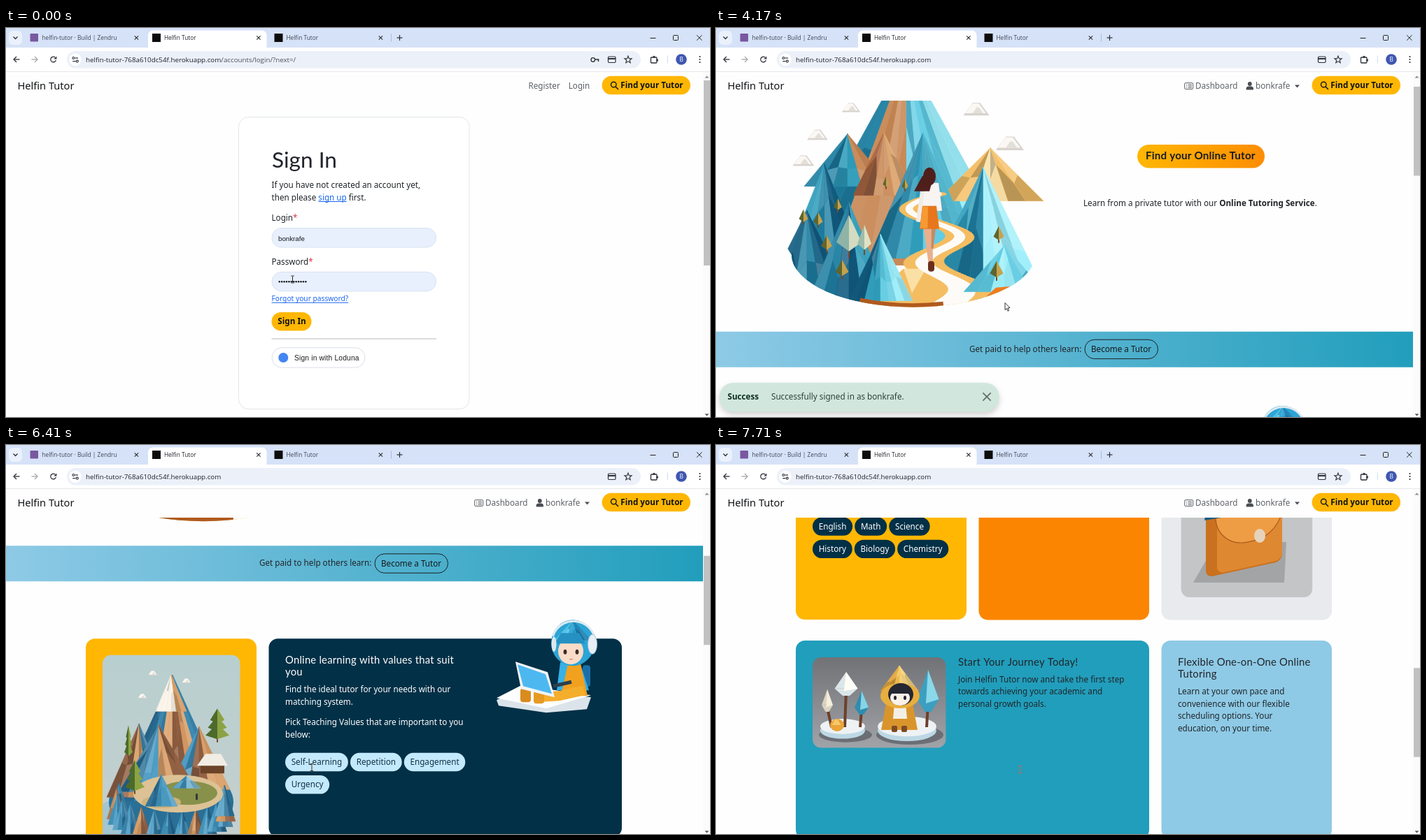
An HTML page with a canvas that plays this animation: 1006 by 557 pixels, repeating every 8000 ms.

```html
<!DOCTYPE html>
<html lang="en">
<head>
<meta charset="utf-8">
<title>Helfin Tutor</title>
<style>
html, body { margin: 0; width: 100%; height: 100%; overflow: hidden; background: #fefefe; }
canvas { display: block; }
</style>
</head>
<body>
<canvas id="stage" width="1006" height="557"></canvas>
<script>
const c = document.getElementById('stage').getContext('2d');
const LOOP = 8000, TAU = Math.PI * 2, LINE = 17.55;
const BRAND = 'Helfin Tutor', USER = 'bonkrafe', HOST = 'helfin-tutor-768a610dc54f.herokuapp.com';
const INK = '#212529', DARK = '#2c2f36', GREY = '#5d6166', WHITE = '#fff';
const NAVY = '#023047', YELLOW = '#ffb703', ORANGE = '#fb8500', TEAL = '#219ebc', SKY = '#8ecae6', ICE = '#c3e9fc';

const noto = (size, weight = 400) => `${weight} ${size}px "Noto Sans", sans-serif`;
const open = size => `${size}px "Open Sans", sans-serif`;
const lato = (size, weight = 400) => `${weight} ${size}px Lato, sans-serif`;
const arial = size => `${size}px "Liberation Sans", Arial, sans-serif`;
const BODY = noto(11.68), SEMI = noto(11.68, 600), BOLD = noto(11.68, 700), HEAD = lato(14.8);

// ---------- timing ----------
// The screen refreshes in bursts: start, end, number of refreshes
const BURSTS = [[0, 0, 1], [150, 840, 6], [1430, 2450, 9], [2570, 3350, 7], [3650, 3770, 2],
  [4170, 5070, 8], [5220, 6260, 7], [6410, 6980, 5], [7260, 7710, 4]];
const PRESS = 1430, LOADED = 2570, SETTLED = 3090, CLOSING = 5480;

const part = (t, a, b) => Math.min(1, Math.max(0, (t - a) / (b - a)));
const easeOut = p => 1 - (1 - p) ** 2;

function refresh(t) {
  const [a, b, n] = BURSTS.filter(k => k[0] <= t).pop();
  const gap = (b - a) / (n - 1) || 1;
  return Math.min(b, a + Math.floor((t - a) / gap + .01) * gap);
}
const scrollAt = t => 217 * easeOut(part(t, 4130, 4600)) + 367 * part(t, 6170, 6980) + 366 * easeOut(part(t, 7200, 7710));
const toastAt = t => part(t, 2700, 2960) - part(t, CLOSING, CLOSING + 110);

// Pointer trips: start, end, place reached
const TRIPS = [[0, 840, 400, 414], [3520, 3770, 413, 393.5], [4550, 5070, 384, 529], [5740, 6260, 437, 461.5], [6560, 6840, 434.5, 464.5]];
function mouseAt(t) {
  let x = 409.5, y = 360;
  for (const [a, b, tx, ty] of TRIPS) {
    const p = part(t, a, b);
    x += (tx - x) * p;
    y += (ty - y) * p;
  }
  return [x, y];
}
function shapeAt(t, y) {
  if (t < LOADED) return y < 377 ? 'beam' : y < 393 || y > 407 ? 'hand' : 'arrow';
  if (t >= 5070 && t < 5740) return 'hand';
  return t >= 6260 && t < 6560 || t >= 7710 ? 'beam' : 'arrow';
}
function rng(seed) {
  let v = seed * 7919 + 13;
  return () => (v = (v * 1664525 + 1013904223) >>> 0) / 4294967296;
}

// ---------- drawing helpers ----------
function paint(fill, edge, w = 1) {
  if (fill) { c.fillStyle = fill; c.fill(); }
  if (edge) { c.strokeStyle = edge; c.lineWidth = w; c.stroke(); }
}
function box(x, y, w, h, r, fill, edge, lw) {
  c.beginPath();
  c.roundRect(x, y, w, h, r);
  paint(fill, edge, lw);
}
function oval(x, y, rx, ry, fill, edge, lw) {
  c.beginPath();
  c.ellipse(x, y, rx, ry, 0, 0, TAU);
  paint(fill, edge, lw);
}
function trace(v) {
  c.beginPath();
  for (let i = 0; i < v.length; i += 2) c.lineTo(v[i], v[i + 1]);
}
function poly(fill, ...v) { trace(v); c.closePath(); paint(fill); }
function line(color, w, ...v) { trace(v); paint(null, color, w); }
// Trapezium hung from the middle of its top edge
function trap(fill, x, y, top, bottom, h, lean = 0) {
  poly(fill, x - top / 2, y, x + top / 2, y, x + lean + bottom / 2, y + h, x + lean - bottom / 2, y + h);
}
function cross(x, y, r, color, w) {
  line(color, w, x - r, y - r, x + r, y + r);
  line(color, w, x - r, y + r, x + r, y - r);
}
function at(dx, dy, art) {
  c.save();
  c.translate(dx, dy);
  art();
  c.restore();
}
function blend(x0, y0, x1, y1, from, to) {
  const g = c.createLinearGradient(x0, y0, x1, y1);
  g.addColorStop(0, from);
  g.addColorStop(1, to);
  return g;
}
function txt(s, x, y, color = INK, font = BODY, gap = 0) {
  c.font = font;
  c.letterSpacing = gap + 'px';
  c.fillStyle = color;
  c.fillText(s, x, y);
  return x + c.measureText(s).width;
}
function link(s, x, y, font) {
  const end = txt(s, x, y, '#1a66f2', font);
  box(x, y + 1.5, end - x, 1, 0, '#1a66f2');
  return end;
}
// Heading and paragraphs (split by |); returns the last baseline
function prose(x, y, title, paragraphs, color = INK) {
  title.split('|').forEach((s, i) => txt(s, x, y += i && LINE, color, HEAD, .22));
  y += 24;
  paragraphs.forEach((p, n) => {
    if (n) y += 29.3;
    p.split('|').forEach((s, i) => txt(s, x, y += i && LINE, color));
  });
  return y;
}
function chips(list, left, y, room, bg, fg) {
  let x = left;
  list.split(' ').forEach(s => {
    c.font = BODY;
    c.letterSpacing = '0px';
    const w = c.measureText(s).width + 17.4;
    if (x + w > left + room) { x = left; y += 32.3; }
    box(x, y, w, 26.4, 13.2, bg);
    txt(s, x + 8.7, y + 17.3, fg);
    x += w + 3.1;
  });
}
function picture(x, y, w, h, fill, art) {
  c.save();
  box(x, y, w, h, 12, fill);
  c.clip();
  art();
  c.restore();
}

// ---------- low-poly parts ----------
function facet(color, tint, pts) {
  poly(color, ...pts.flat());
  paint(null, color, .6);
  paint(tint > 0 ? `rgba(255,255,255,${tint * .45})` : `rgba(0,25,45,${-tint * .5})`);
}
// Mountain as a fan of facets, coloured from left to right
function peak(x, y, w, h, cols, seed = 1) {
  const rnd = rng(seed), n = cols.length * 2;
  const spot = (i, f) => [x + (i / n * 2 - 1) * w * f, y + h * f];
  const mid = Array.from({ length: n + 1 }, (_, i) => spot(i, .3 + .45 * rnd()));
  for (let i = 0; i < n; i++) {
    const col = cols[i >> 1];
    facet(col, rnd() - .5, [[x, y], mid[i], mid[i + 1]]);
    facet(col, rnd() - .5, [mid[i], mid[i + 1], spot(i + 1, 1), spot(i, 1)]);
  }
}
function tree(x, y, w, h, dark, light, trunk = '#7a4a26') {
  box(x - 1, y + h * .7, 2, h * .5, 0, trunk);
  poly(dark, x, y, x - w / 2, y + h * .75, x, y + h);
  poly(light, x, y, x + w / 2, y + h * .75, x, y + h);
}
function cloud(x, y, s) {
  at(x, y, () => {
    trap('#d8d3cd', 0, -8 * s, 10 * s, 35 * s, 17 * s);
    trap('#fbf8f4', -1 * s, -7 * s, 9 * s, 28 * s, 13 * s);
    trap('#e3dfdb', 2 * s, -2 * s, 3 * s, 14 * s, 8 * s);
  });
}

// ---------- illustrations ----------
const DEEP = '#125c80', BLUE = '#1f7fa1', MID = '#2f9cba', AQUA = '#5fcbe2', PALE = '#9deefa';
const SAND = '#f4bd62', CREAM = '#fbe0a6', CLAY = '#c78652', RUST = '#a8623a';

function path(extra, color) {
  for (let u = 0; u < 1; u += .01) {
    const bend = Math.cos(TAU * (u - .14) / .48) * (38 - 19 * u);
    oval(308 + 25 * u - bend, 238 + 160 * u, 5 + 20 * u * u + extra * (.4 + u), 3, color);
  }
}
function walker() {
  trap('#e8b08c', 303, 286, 13, 6, 54, 4);
  trap('#c98865', 311, 286, 6, 3, 30, -2);
  box(303, 334, 9, 15, 4, '#6b2f1c');
  trap('#f7f4f2', 309, 222, 18, 32, 40, -2);
  line('#f0ece9', 6, 295, 234, 289, 278);
  trap('#e8761c', 305, 255, 20, 28, 33);
  trap('#f79a34', 299, 256, 8, 11, 31, -2);
  oval(305, 213, 9, 13, '#4f1f1c');
  trap('#4f1f1c', 303, 212, 16, 22, 22, -9);
}
function trail() {
  c.save();
  c.beginPath();
  c.ellipse(282, 325, 174, 75, 0, 0, Math.PI);
  c.lineTo(60, 250);
  c.lineTo(60, 0);
  c.lineTo(520, 0);
  c.lineTo(520, 250);
  c.clip();
  peak(272, 40, 165, 300, [BLUE, CLAY, CLAY, AQUA, AQUA, PALE], 3);
  peak(392, 172, 76, 76, [SAND, CREAM, SAND], 4);
  peak(188, 152, 62, 75, [BLUE, MID, CLAY], 5);
  peak(240, 150, 44, 90, [RUST, CLAY, '#dba36c'], 6);
  peak(296, 150, 78, 180, [BLUE, MID, AQUA, AQUA], 7);
  peak(155, 195, 60, 150, [MID, BLUE, DEEP], 8);
  peak(382, 200, 94, 190, [MID, BLUE, PALE, PALE], 9);
  peak(130, 262, 70, 140, [DEEP, BLUE, DEEP], 10);
  peak(190, 250, 62, 150, [BLUE, DEEP, MID], 11);
  path(17, SAND);
  poly(SAND, 268, 345, 300, 345, 345, 380, 325, 402, 200, 402);
  poly(CREAM, 268, 345, 300, 345, 280, 380);
  path(0, '#fdfbf7');
  peak(412, 312, 58, 66, [AQUA, PALE, AQUA], 12);
  poly('#ee7d1e', 378, 392, 400, 372, 445, 368, 425, 385);
  peak(235, 296, 46, 95, [DEEP, MID, AQUA, PALE], 13);
  c.beginPath();
  c.ellipse(282, 325, 173, 74, 0, 1.32, 2.03);
  paint(null, '#b05a1e', 9);
  c.restore();
  tree(190, 268, 36, 52, '#8fb3a6', '#d3dcc0');
  tree(212, 282, 20, 36, '#9fbca9', '#dfe3c6');
  for (const [x, y] of [[125, 260], [146, 264], [174, 244], [158, 297], [180, 332], [243, 213], [270, 216], [404, 284], [401, 334]])
    tree(x, y, 8 + (y - 200) / 12, 14 + (y - 200) / 14, '#5d6530', '#c6a24e');
  for (const [x, y] of [[193, 114], [372, 116], [145, 153], [125, 190], [420, 165]]) cloud(x, y, .75 + Math.abs(x - 200) / 550);
  walker();
}

function island() {
  const blue = '#4597c0', deep = '#2a6f96', tan = '#d79a62', brown = '#8f5d3e', snow = '#fbf3e8';
  oval(180, 560, 75, 55, '#a3c6d2');
  oval(236, 512, 89, 54, deep);
  peak(238, 330, 82, 180, [deep, blue, tan, brown, tan, blue], 2);
  peak(236, 330, 22, 52, [snow, snow, tan], 3);
  peak(190, 400, 46, 105, [brown, tan, deep], 4);
  peak(276, 404, 44, 90, [blue, brown, tan], 5);
  peak(218, 402, 56, 95, [deep, blue, tan, brown], 6);
  for (let i = 0; i <= 14; i++) {
    const a = Math.PI * (1.1 - i / 12), x = 236 + 78 * Math.cos(a), y = 494 + 30 * Math.sin(a);
    peak(x, y, 14, 44, i % 4 === 1 ? [tan, brown] : [blue, deep], i + 7);
  }
  oval(246, 500, 64, 27, '#dcc295');
  oval(260, 499, 42, 17, '#87914a');
  oval(222, 512, 28, 9, '#cfb27c');
  peak(222, 473, 23, 45, [deep, blue, blue], 30);
  peak(258, 474, 20, 18, [blue, SKY], 31);
  box(278, 457, 34, 14, 1, '#6b4328');
  trap('#f1ece4', 296, 443, 22, 44, 17, -1);
  [[302, 378, 34], [184, 452, 28], [175, 402, 12]].forEach(([x, y, w]) => {
    for (let i = 0; i < 3; i++) tree(x, y + i * 11, w * (.6 + i * .2), 22, '#4d6a2c', '#8ba343');
  });
  box(271, 500, 3, 9, 1, '#33383c');
  [[210, 327], [258, 338], [195, 360]].forEach(([x, y]) => cloud(x, y, .4));
}

function coder() {
  poly('#dbe4ea', 701, 366, 736, 348, 836, 362, 830, 379, 772, 384, 704, 374);
  poly('#fbfdfe', 701, 363, 736, 345, 836, 359, 772, 378);
  box(824, 316, 11, 31, 4, '#1b6fa8');
  trap('#39b1e6', 806, 312, 28, 46, 40, 4);
  trap('#f2a11f', 812, 314, 18, 38, 46);
  line('#f5ad2c', 14, 826, 352, 790, 360, 758, 362);
  box(735, 349, 15, 20, 4, '#d98b1d');
  box(754, 351, 15, 20, 4, '#e79a22');
  poly('#f0f4f7', 728, 311, 774, 326, 784, 362, 736, 350);
  poly('#4db8f0', 731, 315, 771, 329, 780, 357, 739, 346);
  line('#2e3f4c', 5, 782, 346, 808, 340);
  oval(810, 284, 31, 33, '#2ca5d6');
  peak(810, 252, 26, 28, ['#49bfe8', '#2ca5d6', '#1c7fb0'], 3);
  oval(807, 296, 18, 19, '#f8dcc8');
  trap('#2591c2', 806, 270, 26, 44, 15);
  [799, 816].forEach(x => oval(x, 297, 2.4, 3.6, '#3c2b27'));
  box(805, 307, 5, 1, 0, '#c77463');
  c.beginPath();
  c.arc(811, 284, 31, Math.PI * 1.1, TAU - .2);
  paint(null, '#dfeaf1', 3);
  oval(838, 286, 6.5, 14, '#e7eff5', '#9fc3d9');
  oval(783, 286, 3.5, 11, '#dbe7ef');
}

function satchel() {
  trap('#a3a4a6', 765, 505, 100, 130, 58, -18);
  c.save();
  c.transform(1, -.22, 0, 1, 700, 466);
  box(0, 0, 109, 90, 10, '#c9711f');
  box(16, 2, 93, 86, 10, '#df8832');
  box(14, 0, 95, 52, [4, 4, 40, 46], '#ee9d45', '#a9591a', 1.2);
  c.restore();
  poly('#f2f2f0', 796, 403, 810, 414, 811, 450, 760, 462, 756, 432);
  poly('#175a82', 698, 474, 704, 438, 768, 404, 786, 410, 762, 440, 722, 470);
  poly('#37b6d8', 704, 438, 768, 403, 798, 404, 720, 456);
  line('#8ee4f2', 2, 710, 442, 770, 408, 794, 407);
  oval(777, 496, 8, 10, '#e6d3bb');
}

function grove() {
  const pot = (x, rx) => {
    oval(x + 4, 415, rx + 6, rx / 3, '#6b6e75');
    oval(x, 409, rx, rx * .36, '#bcd8e4');
    oval(x, 403, rx, rx * .34, '#eef2f4');
  };
  const gem = (x, y, w, h, dark, light) => {
    line('#6d3f2a', 4, x, y + h * .8, x + (x < 180 ? 6 : -2), 404);
    trap(dark, x, y, 0, w, h * .7);
    trap(dark, x, y + h * .7, w, w * .3, h * .3);
    poly(light, x, y, x + w / 2, y + h * .7, x - w * .1, y + h * .8);
  };
  pot(181, 32);
  pot(273, 42);
  gem(159, 350, 16, 32, '#d9d3c0', '#f4eedb');
  gem(208, 352, 20, 34, '#2f8cb0', '#86d4e6');
  gem(186, 325, 33, 34, '#dbe6e9', '#fffdf6');
  gem(303, 322, 31, 60, '#3c9fc0', '#8ad8ea');
  oval(173, 401, 10, 9, '#eaa438');
  trap('#f7c769', 172, 393, 4, 13, 8);
  trap('#d9952c', 262, 370, 38, 52, 38);
  trap('#f3efe6', 263, 370, 16, 20, 22);
  peak(262, 316, 27, 36, ['#e3a335', '#f4c252', '#fbd981'], 8);
  oval(263, 359, 28, 18, '#e8ae3e');
  oval(264, 357, 18, 16, '#252832');
  oval(263, 362, 14, 11, '#faf1e9');
  trap('#252832', 264, 344, 18, 28, 12);
  [256, 270].forEach(x => {
    oval(x, 362, 2, 3, '#22252c');
    box(x - 5, 402, 8, 9, 2, '#7c4a25');
  });
}

// ---------- pages ----------
function signIn(t) {
  const entered = t >= PRESS;
  box(332.5, 127.5, 329.5, 418, 14, WHITE, '#e3e6e9');
  txt('Sign In', 380, 200, '#22242c', lato(31.6));
  txt('If you have not created an account yet,', 379.5, 229);
  txt(' first.', link('sign up', txt('then please ', 379.5, 246.6), 246.6), 246.6);
  [['Login', 276], ['Password', 338.8]].forEach(([s, y]) => {
    txt('*', txt(s, 379.5, y), y, '#dc3545');
    box(380, y + 10.6, 234.5, 27.4, 13.7, '#e8f0fe', '#d6e2f0');
  });
  txt(USER, 389, 304.5, '#15181b', entered ? BODY : arial(9.73));
  const gap = entered ? 4.35 : 3.42;
  for (let i = 0; i < 12; i++) oval(389 + gap * (i + .5), 363.3, gap * .36, gap * .36, '#15181b');
  link('Forgot your password?', 379.5, 391.3, noto(10.22));
  box(379.5, 407, 57, 26.4, 13.2, t >= 700 ? '#ffc333' : YELLOW);
  txt('Sign In', 388.3, 424.2, '#111', SEMI);
  box(379.5, 444.3, 235.5, 1.4, 0, '#cfd1d3');
  box(380, 457.8, 133, 28.4, 14.2, WHITE, '#dadfe6');
  oval(396.3, 472, 7, 7, '#4285f4');
  txt('Sign in with Loduna', 412, 475.6, '#1f1f1f', arial(10.22), .18);
}

const card = (x, y, w, h, fill) => box(x, y, w, h, 13, fill);

function hero() {
  trail();
  box(602, 167.3, 182, 33.6, 16.8, blend(602, 0, 784, 0, YELLOW, '#fd8d03'));
  txt('Find your Online Tutor', 614, 188.4, '#191c20', lato(15.2, 700), .18);
  txt('.', txt('Online Tutoring Service', txt('Learn from a private tutor with our ', 525, 255), 255, INK, BOLD), 255);
  box(0, 435, 996, 51, 0, blend(0, 0, 996, 0, SKY, TEAL));
  txt('Get paid to help others learn:', 362, 464);
  box(527, 446.6, 104.5, 27.4, 13.7, null, '#1c2024');
  txt('Become a Tutor', 536, 464.4, '#16191c');
}
function offers() {
  card(114, 278, 244, 597, YELLOW);
  picture(138, 301.5, 196.5, 287, blend(0, 302, 0, 588, '#b8cfcf', '#c6cfce'), island);
  let y = prose(138, 618, 'Online Tutoring Service with|the Subject you want',
    ['Find a private Tutor for the field|that you want to know more about.', 'Pick a subject below:']);
  chips('English Math Science History Biology Chemistry', 138, y + 22, 199, NAVY, WHITE);
  card(375.5, 278, 504.5, 284, NAVY);
  y = prose(399, 313.6, 'Online learning with values that suit|you',
    ['Find the ideal tutor for your needs with our|matching system.', 'Pick Teaching Values that are important to you|below:'], WHITE);
  chips('Self-Learning Repetition Engagement Urgency', 399, y + 22, 270, ICE, '#123247');
  coder();
}
function payments(s) {
  card(375.5, 333, 243.5, 283.5, ORANGE);
  prose(399, 368.6, 'Secure and Affordable|Payments',
    ['Invest in your future without|breaking the bank. Enjoy|competitive rates with secure,|hassle-free transactions.']);
  card(636.5, 333, 243.5, 283.5, s > 600 ? '#e9eaee' : '#fafbfb');
  picture(664.6, 365, 187.6, 219, '#c4c5c6', satchel);
}
function journey() {
  card(114, 280, 505, 284, TEAL);
  picture(138, 304, 190.4, 129.5, blend(0, 304, 0, 433, '#717276', '#a0a3a8'), grove);
  prose(346, 315.8, 'Start Your Journey Today!',
    [`Join ${BRAND} now and take the first step|towards achieving your academic and|personal growth goals.`]);
  card(636.5, 280, 243.5, 284, SKY);
  prose(660, 315.8, 'Flexible One-on-One Online|Tutoring',
    ['Learn at your own pace and|convenience with our flexible|scheduling options. Your|education, on your time.']);
}
function home(s) {
  at(0, 35 - s, hero);
  at(0, 325 - s, offers);
  at(0, 584 - s, () => payments(s));
  at(0, 950 - s, journey);
}

function toast(t) {
  const alpha = toastAt(t);
  if (alpha <= 0) return;
  c.save();
  c.globalAlpha = alpha;
  c.shadowColor = 'rgba(0,0,0,.18)';
  c.shadowBlur = 8;
  c.shadowOffsetY = 4;
  box(5, 508, 399.5, 41.5, 20, '#d1e7dd');
  c.shadowColor = 'transparent';
  txt('Success', 16.5, 532.3, '#0f2f22', BOLD);
  txt(`Successfully signed in as ${USER}.`, 79, 532.3, '#2b4338');
  c.restore();
  if (t >= CLOSING) box(367, 508, 38.5, 41, 19, null, 'rgba(120,130,135,.25)', 4);
  cross(387, 528, 5.6, '#5e6a64', 1.6);
}

function navbar(inside) {
  box(0, 63, 996, 41, 0, '#fefefe');
  txt(BRAND, 16.5, 88.4, '#111417', noto(14.6));
  if (inside) {
    box(669.7, 78.6, 12, 9, 1.5, null, GREY);
    for (let y = 81; y < 87; y += 2.2) {
      line(GREY, 1, 672, y, 673, y);
      line(GREY, 1, 674.5, y, 680, y);
    }
    txt('Dashboard', 685, 87.4, GREY);
    oval(762.8, 80, 2.9, 2.9, '#4a4e53');
    box(757.5, 83.6, 10.6, 5, [4, 4, 1, 1], '#4a4e53');
    txt(USER, 771, 87.4, GREY);
    trap('#4a4e53', 830.5, 81.5, 7, 0, 4);
  } else {
    txt('Register', 746.5, 87.4, GREY);
    txt('Login', 803.7, 87.4, GREY);
  }
  box(851.6, 68.8, 126.4, 26.5, 13.2, YELLOW);
  oval(868.3, 81, 3.8, 3.8, null, '#14171a', 1.4);
  line('#14171a', 1.6, 871, 84, 875, 88);
  txt('Find your Tutor', 878.3, 86.3, '#111417', SEMI);
}

function scrollbar(y, h) {
  box(996, 63, 10, 494, 0, '#fbfbfb');
  box(997, y, 9, h, 0, '#c1c1c1');
  trap('#8b8b8b', 1001.5, 68.5, 0, 6, 3);
  trap('#505050', 1001.5, 552.5, 6, 0, 3);
}

function tabs(t, busy) {
  box(0, 0, 1006, 28, 0, '#d6e2f8');
  box(4, 4, 19, 20, 6, '#ebf1fc');
  line(DARK, 1.3, 10.5, 12.5, 13.5, 15.5, 16.5, 12.5);
  box(203, 3.5, 169.5, 30, 7, WHITE);
  box(34.5, 8, 11.5, 11.5, 1, '#79589f');
  txt('helfin-tutor · Build | Zendru', 51.5, 17.3, '#3f4756', open(8.3));
  txt(BRAND, 226, 17.3, '#1f2228', open(8.3));
  txt(BRAND, 400.5, 17.3, '#3f4756', open(8.3));
  if (busy) {
    const a = 2.6 - (t - 2067) * .007;
    c.beginPath();
    c.arc(214.5, 14, 5.2, a, a + 2.4);
    paint(null, t >= LOADED ? '#4a73d8' : '#bcc8ea', 1.3);
  } else box(209, 8, 12, 12, 0, '#0c0c0c');
  box(383.5, 8, 12, 12, 0, '#0c0c0c');
  for (let i = 0; i < 3; i++) cross(186.4 + 174.5 * i, 14, 2.7, DARK, 1.1);
  box(550, 8.5, 1, 11, 0, '#a9bbdd');
  line(DARK, 1.2, 558.5, 14, 566.5, 14);
  line(DARK, 1.2, 562.5, 10, 562.5, 18);
  line('#222', 1, 920.5, 14.5, 928.5, 14.5);
  box(953.5, 10.5, 7, 7, 1, null, '#222');
  cross(990.8, 14, 3.7, '#222', 1);
}

function toolbar(inside, busy) {
  const arrow = (x, d, color) => {
    line(color, 1.3, x + 8.5 * d, 45, x, 45);
    line(color, 1.3, x + 4 * d, 41, x, 45, x + 4 * d, 49);
  };
  box(0, 28, 1006, 35, 0, WHITE);
  box(0, 62, 1006, 1, 0, '#e4e7ec');
  arrow(11, 1, DARK);
  arrow(45, -1, '#a4a7ad');
  if (busy) cross(67.7, 45, 3.4, DARK, 1.3);
  else {
    c.beginPath();
    c.arc(67.7, 45, 3.9, .3, 5.4);
    paint(null, DARK, 1.3);
    poly(DARK, 72.4, 40.4, 72.4, 44.4, 68.4, 44.4);
  }
  box(87, 33, 820, 24.5, 12.2, '#ecf0f9');
  oval(99, 45.3, 8.7, 8.7, WHITE);
  [[96.4, 43, 1], [101.8, 47.6, -1]].forEach(([x, y, d]) => {
    oval(x, y, 1.5, 1.5, null, DARK, 1.1);
    line(DARK, 1.2, x + 2.3 * d, y, x + 6.6 * d, y);
  });
  const end = txt(HOST, 114, 49, '#1f2228', open(9.78));
  if (!inside) {
    txt('/accounts/login/?next=/', end, 49, '#4d525b', open(9.78));
    oval(838.8, 45.5, 2.8, 2.8, null, DARK, 1.3);
    line(DARK, 1.6, 841.6, 45, 846.5, 45, 846.5, 48);
  }
  box(860.5, 41, 10.5, 8.5, 1.2, null, DARK, 1.2);
  box(860.5, 43, 10.5, 2, 0, DARK);
  const star = Array.from({ length: 10 }, (_, i) => {
    const a = i * Math.PI / 5, r = i & 1 ? 2.3 : 5.4;
    return [889 + r * Math.sin(a), 45.5 - r * Math.cos(a)];
  });
  poly(null, ...star.flat());
  paint(null, DARK, 1.1);
  box(921.5, 42, 8.5, 8, 1, null, DARK, 1.3);
  oval(926, 41.3, 1.5, 1.5, DARK);
  oval(930.6, 46, 1.5, 1.5, DARK);
  box(945, 39.5, 1, 11, 0, '#cfdbf2');
  oval(965, 45, 7.8, 7.8, '#3f57b0');
  txt('B', 962.5, 48.2, WHITE, open(8.2));
  for (let y = 41; y < 50; y += 4) oval(991.5, y, 1.1, 1.1, DARK);
}

function pointer(shape) {
  if (shape === 'beam') {
    // Inverts whatever lies below
    c.globalCompositeOperation = 'difference';
    line(WHITE, .9, 0, -4.5, 0, 4.5);
    [-5, 5].forEach(y => line(WHITE, .9, -2.2, y, 2.2, y));
  } else if (shape === 'hand') {
    box(-3, 5.5, 9, 8, 3, WHITE, '#000', .9);
    box(-1.2, 0, 2.6, 9, 1.3, WHITE, '#000', .9);
    box(-.7, 5, 6, 6, 2, WHITE);
    [1.4, 3.2].forEach(x => line('#000', .6, x, 8.5, x, 11));
  } else {
    poly(WHITE, 0, 0, 0, 10.2, 2.4, 8, 4, 11.8, 5.6, 11, 4, 7.4, 7, 7.2);
    paint(null, '#000', .8);
  }
}

function draw(t) {
  const s = scrollAt(t), inside = t >= LOADED, busy = t >= PRESS && t < SETTLED;
  box(0, 0, 1006, 557, 0, '#fefefe');
  if (inside) {
    home(s);
    toast(t);
  } else signIn(t);
  navbar(inside);
  scrollbar(75 + s / 3.89, inside ? 127.5 : 265);
  tabs(t, busy);
  toolbar(inside, busy);
  const [x, y] = mouseAt(t);
  at(x, y, () => pointer(shapeAt(t, y)));
}

const start = performance.now();
let shown = -1;
function frame() {
  const t = refresh((performance.now() - start) % LOOP);
  if (t !== shown) draw(shown = t);
  requestAnimationFrame(frame);
}
frame();
</script>
</body>
</html>
```
